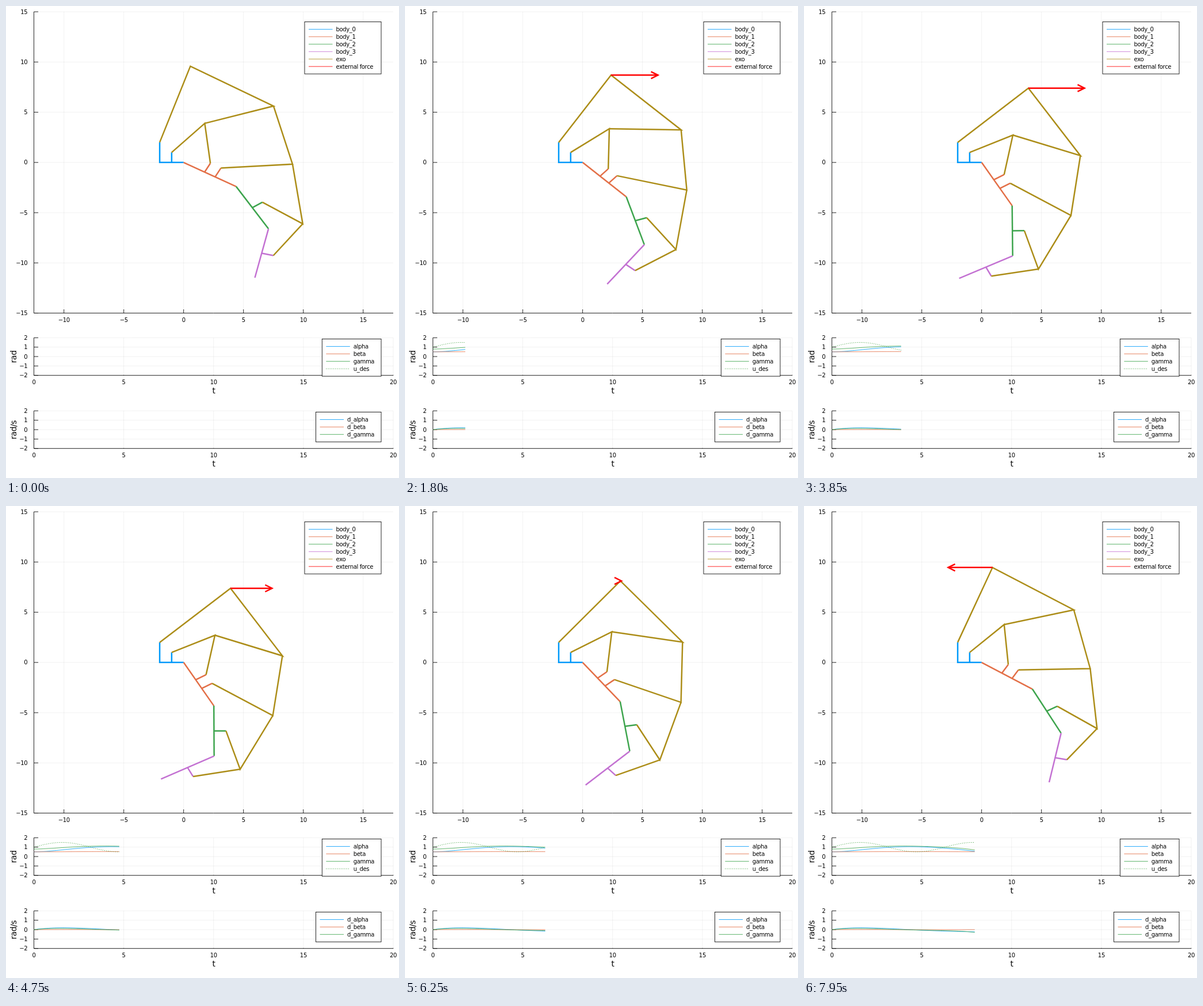
Write an HTML page with a canvas that moves like this. It is 683 px wide and 820 px high and loops after 8000 ms.

```html
<!DOCTYPE html>
<html>
<head>
<meta charset="utf-8">
<style>
html, body { margin: 0; width: 100%; height: 100%; overflow: hidden; background: #fff; }
canvas { display: block; }
</style>
</head>
<body>
<canvas id="stage" width="683" height="820"></canvas>
<script>
const ctx = document.getElementById('stage').getContext('2d');
const BLUE = '#009afa', ORANGE = '#e36f47', GREEN = '#3da44d', PURPLE = '#c371d2',
      GOLD = '#ac8d18', RED = '#ff0000', DARK_GREEN = '#008000';
const THIN = .85, THICK = 2.5, DOTS = [1, 2.2];
const LEFT = 48.5, RIGHT = 673;
const LOOP = 8000, STEP = 50;

// Joint angles in radians over time in seconds
const alpha = t => .5 + t * t * (.13555 - t * (.038195 - t * (.0037235 - t * .00013197)));
const beta = t => .51 + .0015 * t - .01 * Math.cos(.8 * t);
const gamma = t => .8 + t * t * (.10745 - t * (.037306 - t * (.0047267 - t * .00022125)));
const desired = t => 1 + Math.sin(t) / 2;
const force = t => 5 * Math.sin(t / 2);
const speed = f => t => (f(t + .01) - f(t - .01)) / .02;

function range(from, to, step) {
  return Array.from({ length: (to - from) / step + 1 }, (_, i) => from + i * step);
}

function stroke(points, color, width = THIN, dash = []) {
  ctx.strokeStyle = color;
  ctx.lineWidth = width;
  ctx.setLineDash(dash);
  ctx.beginPath();
  points.forEach(([x, y]) => ctx.lineTo(x, y));
  ctx.stroke();
}

function label(str, x, y, align = 'center', size = 10) {
  ctx.font = size + 'px "DejaVu Sans", sans-serif';
  ctx.letterSpacing = '-0.35px';
  ctx.textAlign = align;
  ctx.fillStyle = '#000';
  ctx.fillText(str, x, y + size * .365);
}

function axes(top, bottom, xTicks, yTicks, toX, toY, tickHeight) {
  const text = v => String(v).replace('-', '\u2212');
  const grid = 'rgba(0,0,0,.055)';
  xTicks.forEach(v => stroke([[toX(v), top], [toX(v), bottom]], grid, 1));
  yTicks.forEach(v => stroke([[LEFT, toY(v)], [RIGHT, toY(v)]], grid, 1));
  stroke([[LEFT, top], [LEFT, bottom], [RIGHT, bottom]], '#000');
  xTicks.forEach(v => {
    stroke([[toX(v), bottom], [toX(v), bottom - tickHeight]], '#000');
    label(text(v), toX(v), bottom + 12);
  });
  yTicks.forEach(v => {
    stroke([[LEFT, toY(v)], [LEFT + 7.5, toY(v)]], '#000');
    label(text(v), 37.2, toY(v), 'right');
  });
}

function legend(x, y, entries) {
  const row = 12.93, width = 652 - x, height = row * (entries.length + 1);
  ctx.fillStyle = '#fff';
  ctx.fillRect(x, y, width, height);
  ctx.setLineDash([]);
  ctx.strokeStyle = '#000';
  ctx.lineWidth = THIN;
  ctx.strokeRect(x, y, width, height);
  entries.forEach(([name, color, , dash], i) => {
    const cy = y + row * (i + 1);
    stroke([[x + 7, cy], [x + 48.5, cy]], color, THIN, dash);
    label(name, x + 54.5, cy, 'left');
  });
}

// Apex of the isosceles triangle with two legs r, left of a -> b
function meet(a, b, r) {
  const dx = b[0] - a[0], dy = b[1] - a[1], d = Math.hypot(dx, dy);
  const h = Math.sqrt(Math.max(0, r * r - d * d / 4)) / d;
  return [(a[0] + b[0]) / 2 - dy * h, (a[1] + b[1]) / 2 + dx * h];
}

// Rigid segment: at(along, out) gives a point in its own frame
function segment(origin, theta) {
  const c = Math.cos(theta), s = Math.sin(theta);
  return (along, out = 0) =>
    [origin[0] + along * c + out * s, origin[1] - along * s + out * c];
}

const mainX = x => 308.7 + 20.8 * x, mainY = y => 271.8 - 17.45 * y;

function mechanism(t) {
  const draw = (color, ...paths) => paths.forEach(path =>
    stroke(path.map(([x, y]) => [mainX(x), mainY(y)]), color, THICK));
  const a = alpha(t), b = a + beta(t), g = b + gamma(t);
  const body1 = segment([0, 0], a);
  const body2 = segment(body1(5), b);
  const body3 = segment(body2(5), g);
  const baseLow = [-1, 1], baseHigh = [-2, 2];
  const inner = body1(2, 1), outer = body1(3, 1), mid = body2(2.5, 1), tip = body3(2.5, 1);

  const p = meet(baseLow, inner, 4);
  const s = meet(mid, tip, 4);
  const r = meet(outer, s, 6);
  const q = meet(p, r, 6);
  const top = meet(baseHigh, q, 8);

  draw(BLUE, [baseHigh, [-2, 0], [0, 0]], [[-1, 0], baseLow]);
  draw(ORANGE, [body1(0), body1(5)], [body1(2), inner], [body1(3), outer]);
  draw(GREEN, [body2(0), body2(5)], [body2(2.5), mid]);
  draw(PURPLE, [body3(0), body3(5)], [body3(2.5), tip]);
  draw(GOLD, [baseLow, p, inner], [baseHigh, top, q, p], [q, r, outer], [r, s, mid], [s, tip]);

  if (t > 0) {
    const x = mainX(top[0] + force(t)), y = mainY(top[1]);
    const back = x - 12 * Math.sign(force(t));
    stroke([[mainX(top[0]), y], [x, y]], RED, THICK);
    stroke([[back, y - 6], [x, y], [back, y + 6]], RED, THICK);
  }
}

function timePlot(top, t, title, curves, legendX) {
  const toX = v => LEFT + 31.225 * v, toY = v => top + 32.7 - 16.35 * v;
  axes(top, top + 65.4, range(0, 20, 5), range(-2, 2, 1), toX, toY, .8);
  label('t', 361, top + 91.5, 'center', 13.75);
  ctx.save();
  ctx.translate(12.7, top + 33);
  ctx.rotate(-Math.PI / 2);
  label(title, 0, 0, 'center', 13.75);
  ctx.restore();
  const times = range(0, Math.round(t * 20), 1).map(i => i / 20);
  curves.forEach(([, color, f, dash]) =>
    stroke(times.map(x => [toX(x), toY(f(x))]), color, THIN, dash));
  legend(legendX, top + 2.2, curves);
}

function render(ms) {
  const t = Math.floor(ms % LOOP / STEP) * STEP / 1000;
  ctx.fillStyle = '#fff';
  ctx.fillRect(0, 0, 683, 820);
  axes(10, 533.5, range(-10, 15, 5), range(-15, 15, 5), mainX, mainY, 6.5);
  mechanism(t);
  legend(519, 27.5, [['body_0', BLUE], ['body_1', ORANGE], ['body_2', GREEN],
    ['body_3', PURPLE], ['exo', GOLD], ['external force', RED]]);
  timePlot(576.3, t, 'rad', [
    ['alpha', BLUE, alpha],
    ['beta', ORANGE, beta],
    ['gamma', GREEN, gamma],
    ['u_des', DARK_GREEN, desired, DOTS]], 549.3);
  timePlot(703.3, t, 'rad/s', [
    ['d_alpha', BLUE, speed(alpha)],
    ['d_beta', ORANGE, speed(beta)],
    ['d_gamma', GREEN, speed(gamma)]], 538.5);
}

const start = performance.now();
function tick() {
  render(performance.now() - start);
  requestAnimationFrame(tick);
}
tick();
</script>
</body>
</html>
```
